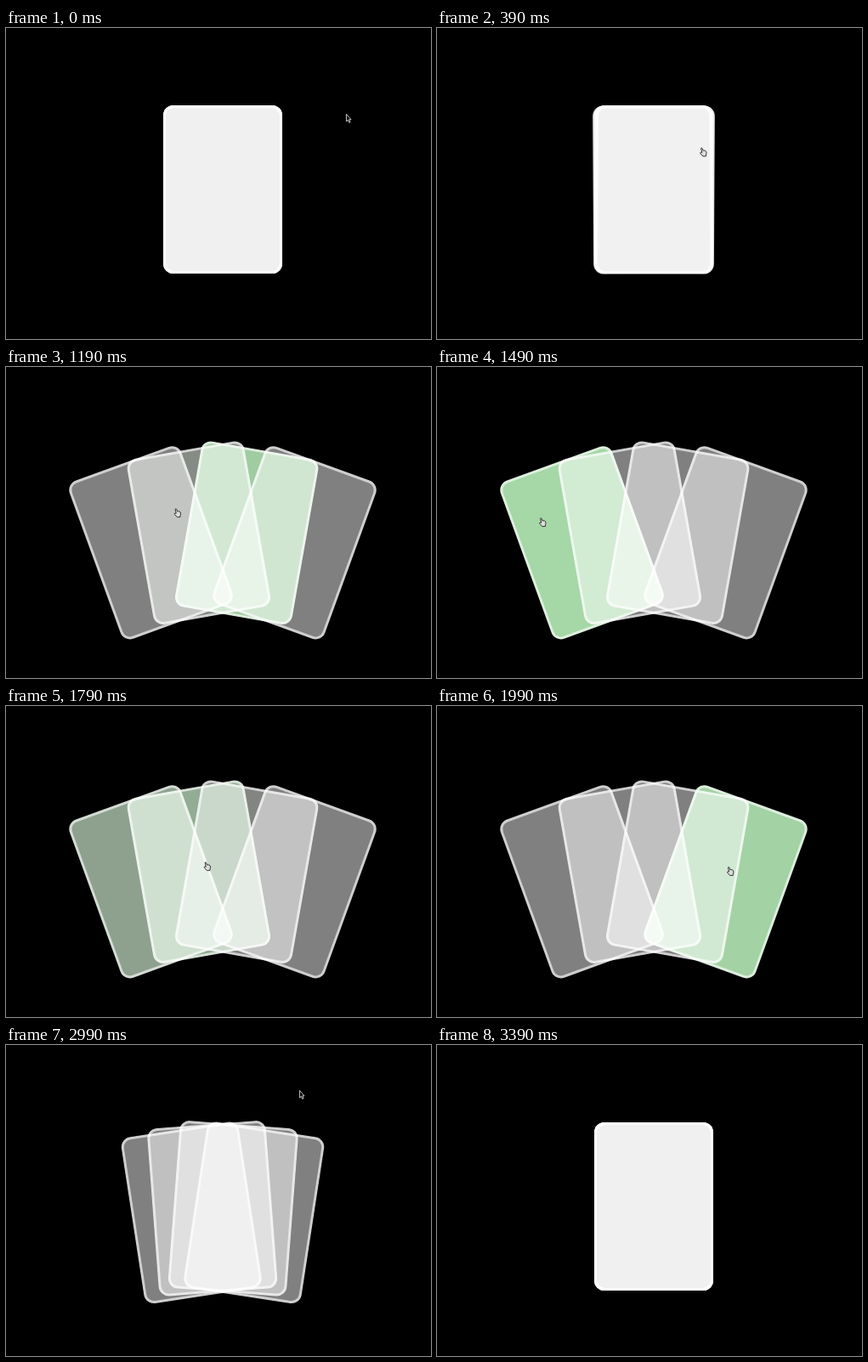
An HTML page that plays this animation: 500x366 px, repeating every 3590 ms.

```html
<!DOCTYPE html>
<html lang="en">
<head>
<meta charset="utf-8">
<title>Card fan</title>
<style>
  html, body { margin: 0; width: 100%; height: 100%; overflow: hidden; background: #000; }
  .stage { position: relative; width: 500px; height: 366px; overflow: hidden; background: #000; isolation: isolate; }
  .card {
    position: absolute; left: 184.7px; top: 90.5px; width: 140px; height: 198px;
    box-sizing: border-box; border: 3px solid rgba(255, 255, 255, .62); border-radius: 12px;
    background: rgb(128, 128, 128); mix-blend-mode: screen;
  }
  .cursor { position: absolute; left: 0; top: 0; width: 16px; height: 16px; overflow: visible; }
</style>
</head>
<body>
<div class="stage">
  <div class="card"></div>
  <div class="card"></div>
  <div class="card"></div>
  <div class="card"></div>
  <svg class="cursor">
    <path id="arrow" d="M.4 .4V9L2.3 7.2 3.6 10.3 5 9.7 3.7 6.7H6Z" fill="#000" stroke="#ddd" stroke-width=".9"/>
    <path id="hand" d="M1.6 1.2Q2.6 .3 3.2 1.4L4.1 4Q6.6 3.2 7.7 5 8.4 7 7.6 8.6L7.4 10.6H3.8L.9 7.4Q.2 6.2 1.4 6L2.7 6.3Z" fill="#ddd" stroke="#222" stroke-width=".9"/>
  </svg>
</div>
<script>
const LOOP = 3590, FRAME = 100, TICK = 10;
const OPEN = 380, CLOSE = 2882, SWING = 330, FADE = 160;
const GREY = [128, 128, 128], GREEN = [165, 215, 167];
const CARD = { x: 254.7, y: 189.5, w: 140, h: 198 };

const cards = [...document.querySelectorAll('.card')];
const cursor = document.querySelector('.cursor');
const arrow = document.getElementById('arrow');
const hand = document.getElementById('hand');

const mix = (a, b, k) => a + (b - a) * k;
const clamp = x => Math.min(1, Math.max(0, x));
const easeOut = s => 1 - (1 - s) ** 3;
const easeInOut = s => s < .5 ? 4 * s ** 3 : 1 - 4 * (1 - s) ** 3;

// The CSS "ease" curve, cubic-bezier(.25, .1, .25, 1).
function ease(x) {
  const curve = (u, p, q) => 3 * u * (1 - u) * ((1 - u) * p + u * q) + u ** 3;
  let lo = 0, hi = 1;
  for (let i = 0; i < 16; i++) {
    const mid = (lo + hi) / 2;
    if (curve(mid, .25, .25) < x) lo = mid; else hi = mid;
  }
  return x >= 1 ? 1 : x <= 0 ? 0 : curve(lo, .1, 1);
}

// The pointer glides from stop to stop.
const home = { x: 400, y: 101 };
const moves = [
  { from: 100, to: 590, x: 275, y: 155, ease: easeInOut },
  { from: 890, to: 1490, x: 120, y: 177, ease: easeInOut },
  { from: 1490, to: 2090, x: 345, y: 189, ease: easeInOut },
  { from: 2690, to: 3210, x: 345, y: 42, ease: easeOut }
];

function pointer(t) {
  return moves.reduce((p, m) => {
    const k = m.ease(clamp((t - m.from) / (m.to - m.from)));
    return { x: mix(p.x, m.x, k), y: mix(p.y, m.y, k) };
  }, home);
}

function poses(t) {
  const open = ease((t - OPEN) / SWING) - ease((t - CLOSE) / SWING);
  return [-2, -1, 1, 2].map(n => {
    const rank = Math.abs(n), side = Math.sign(n);
    return { turn: 10 * n * open, x: 56.3 * (rank - .5) * side * open, y: (11.6 * rank - 6.4) * open };
  });
}

function contains(pose, p) {
  const a = pose.turn * Math.PI / 180;
  const dx = p.x - CARD.x - pose.x, dy = p.y - CARD.y - pose.y;
  return Math.abs(dx * Math.cos(a) + dy * Math.sin(a)) < CARD.w / 2
    && Math.abs(dy * Math.cos(a) - dx * Math.sin(a)) < CARD.h / 2;
}

// Index of the topmost card under the pointer, or -1.
function hit(t) {
  const p = pointer(t);
  return poses(t).map(pose => contains(pose, p)).lastIndexOf(true);
}

// Each card fades towards green while hovered, and back when left.
function glow(t) {
  const levels = cards.map(() => 0);
  for (let u = 0; u < t; u += TICK) {
    const hot = hit(u);
    levels.forEach((v, i) => { levels[i] = clamp(v + (i === hot ? TICK : -TICK) / FADE); });
  }
  return levels;
}

function draw(t) {
  const levels = glow(t), p = pointer(t), over = hit(t) >= 0;
  poses(t).forEach((pose, i) => {
    const rgb = GREY.map((c, n) => Math.round(mix(c, GREEN[n], levels[i])));
    cards[i].style.transform = `translate(${pose.x}px, ${pose.y}px) rotate(${pose.turn}deg)`;
    cards[i].style.backgroundColor = `rgb(${rgb.join()})`;
  });
  hand.style.display = over ? '' : 'none';
  arrow.style.display = over ? 'none' : '';
  cursor.style.visibility = t < 3390 ? 'visible' : 'hidden';
  cursor.style.transform = `translate(${p.x}px, ${p.y}px)`;
}

const start = performance.now();
let shown;
function tick() {
  const t = (performance.now() - start) % LOOP;
  const now = Math.floor((t + 10) / FRAME) * FRAME - 10;
  if (now !== shown) draw(shown = now);
  requestAnimationFrame(tick);
}
tick();
</script>
</body>
</html>
```
